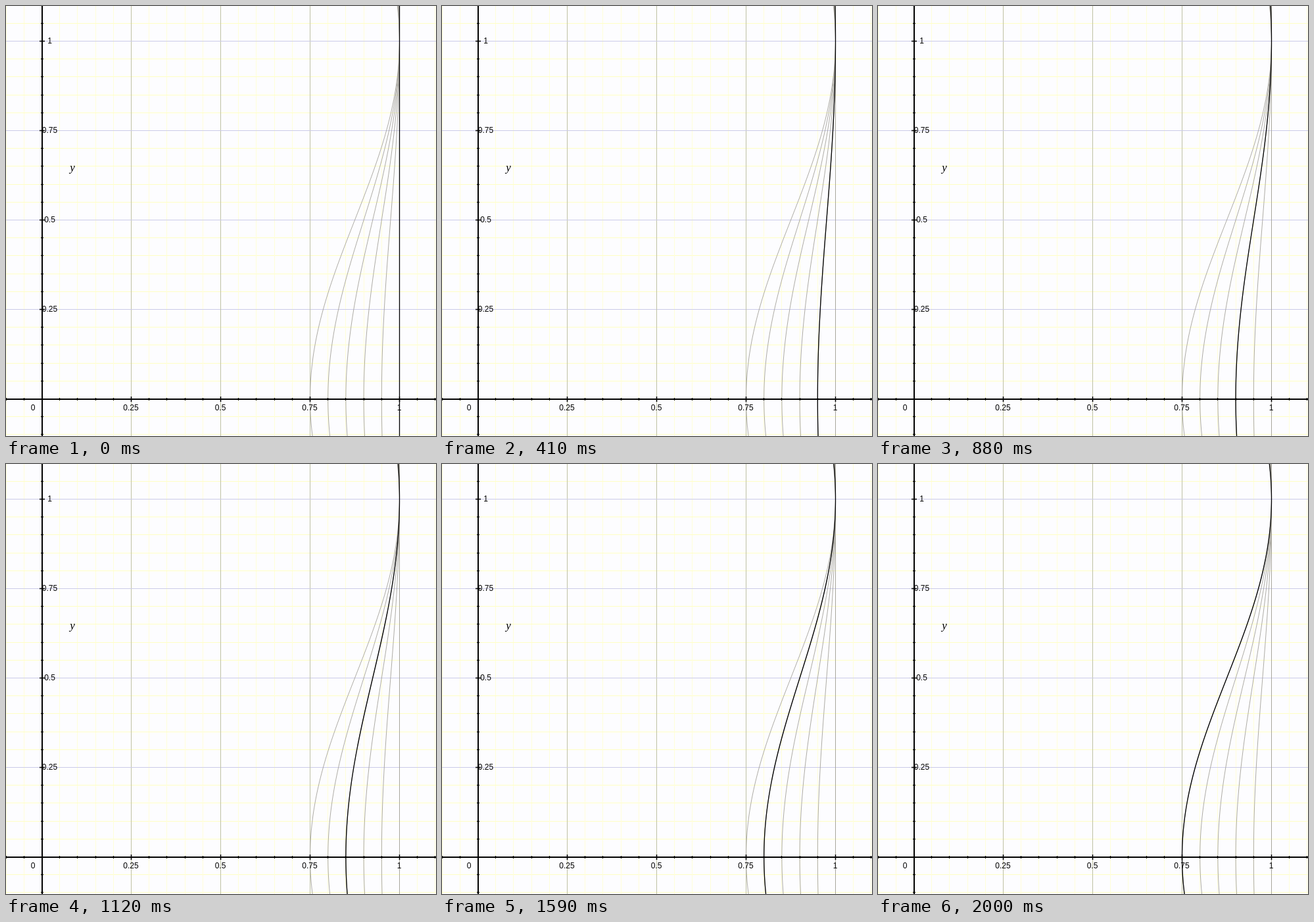
Animation, 654 px wide and 654 px high, one loop 2.06 s. Source, as an HTML page with a canvas:

```html
<!DOCTYPE html>
<html lang="en">
<head>
<meta charset="utf-8">
<title>Curve family</title>
<style>
  html, body { margin: 0; width: 100%; height: 100%; overflow: hidden; background: #fdfdff; }
  canvas { display: block; }
</style>
</head>
<body>
<canvas id="plot" width="654" height="654"></canvas>
<script>
const SIZE = 654, LOOP = 2060, UNIT = 544, X0 = 54.5, Y0 = 597.5;
const STARTS = [240, 650, 1060, 1410, 1880]; // when each next curve is picked
const ctx = document.getElementById('plot').getContext('2d');
const px = x => X0 + x * UNIT;
const py = y => Y0 - y * UNIT;
const snap = v => Math.floor(v) + 0.5;

function line(x1, y1, x2, y2, color, width = 1) {
  ctx.strokeStyle = color;
  ctx.lineWidth = width;
  ctx.beginPath();
  ctx.moveTo(x1, y1);
  ctx.lineTo(x2, y2);
  ctx.stroke();
}

function drawGrid() {
  const rules = (major, vertical, horizontal) => {
    for (let i = -2; i <= 22; i++) {
      if ((i % 5 === 0) !== major) continue;
      const x = snap(px(i / 20)), y = snap(py(i / 20));
      line(x, 0, x, SIZE, vertical);
      line(0, y, SIZE, y, horizontal);
    }
  };
  rules(false, '#fffed9', '#ffffc4');
  rules(true, '#bfc1a4', '#cbcbe8');
}

// x = 1 - depth * cos^2(pi * y / 2)
function drawCurve(index, color, width) {
  const depth = index / 20;
  ctx.strokeStyle = color;
  ctx.lineWidth = width;
  ctx.beginPath();
  for (let y = -2; y <= SIZE + 2; y += 2) {
    const c = Math.cos(Math.PI / 2 * (Y0 - y) / UNIT);
    ctx.lineTo(px(1 - depth * c * c), y);
  }
  ctx.stroke();
}

function drawAxes() {
  line(55, 0, 55, SIZE, '#000', 2);
  line(0, 598, SIZE, 598, '#000', 2);
  for (let i = -2; i <= 22; i++) {
    if (!i) continue;
    const major = i % 5 === 0, reach = major ? 4 : 2, width = major ? 1.6 : 1.3;
    const x = snap(px(i / 20)), y = snap(py(i / 20));
    line(x, 598 - reach, x, 598 + reach, '#000', width);
    line(55 - reach, y, 55 + reach, y, '#000', width);
  }
  ctx.fillStyle = '#000';
  ctx.textAlign = 'center';
  ctx.font = '12px "Liberation Sans", Helvetica, Arial, sans-serif';
  ctx.fillText('0', 41, 615);
  for (const v of [0.25, 0.5, 0.75, 1]) {
    ctx.fillText(v, px(v) - 0.5, 615);
    ctx.fillText(v, 66.5, py(v) + 3.5);
  }
  ctx.font = 'italic 17px "Liberation Serif", Times, serif';
  ctx.fillText('y', 101, 251);
}

function draw(now) {
  const t = now % LOOP;
  const active = STARTS.filter(s => t >= s).length;
  ctx.fillStyle = '#fdfdff';
  ctx.fillRect(0, 0, SIZE, SIZE);
  drawGrid();
  for (let i = 0; i <= 5; i++) drawCurve(i, '#a5a39b', 0.9);
  drawCurve(active, '#000', 1.3);
  drawAxes();
}

let start;
function tick(now) {
  start ??= now;
  draw(now - start);
  requestAnimationFrame(tick);
}
requestAnimationFrame(tick);
</script>
</body>
</html>
```
